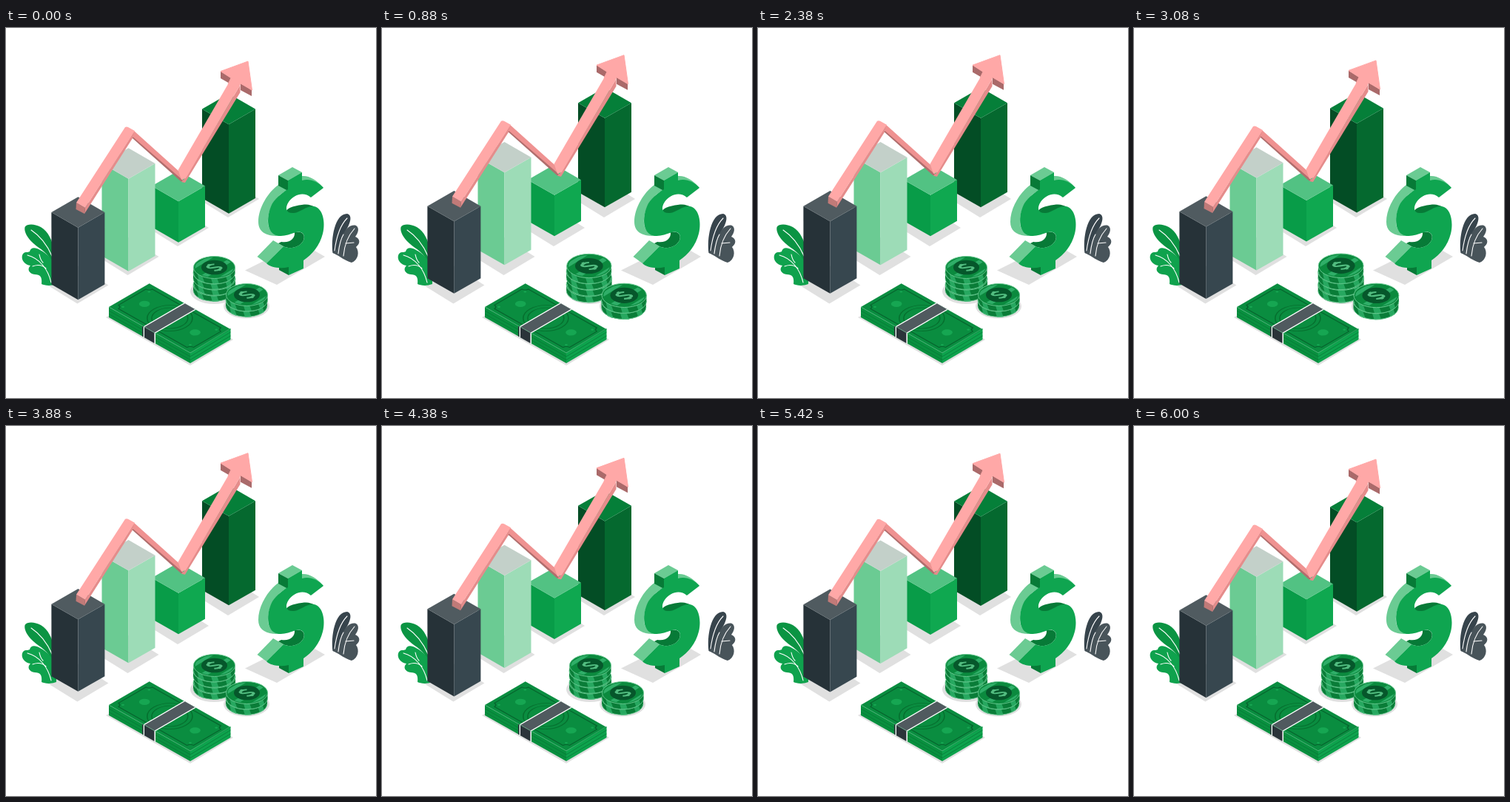
Animation, 500 px wide and 500 px high, one loop 6.04 s. Source, as an HTML page:

```html
<!DOCTYPE html>
<html lang="en">
<head>
<meta charset="utf-8">
<title>Growth chart</title>
<style>
html, body { margin: 0; width: 100%; height: 100%; overflow: hidden; background: #fff; }
svg { display: block; width: 100vw; height: 100vh; }
.vein { fill: none; stroke: #fff; stroke-width: 1.1; stroke-linecap: round; }
</style>
</head>
<body>
<svg viewBox="0 0 500 500">
  <defs>
    <clipPath id="coinClip"><ellipse rx="26" ry="13.4"/></clipPath>
    <clipPath id="rimClip"><path d="M-28 0A28 15 0 0 0 28 0V8A28 15 0 0 1-28 8Z"/></clipPath>
    <g id="coin">
      <path d="M-28 0V7.5A28 15 0 0 0 28 7.5V0Z" fill="#0a7d38"/>
      <path d="M-24 4l6 3 5 14h-7zM-6 10h8l6 16h-9zM14 8l6-4 4 12-6 3z" fill="#27a860" clip-path="url(#rimClip)"/>
      <path d="M-28 7.300A28 15 0 0 0 28 7.300" fill="none" stroke="#6bcb93" stroke-width=".8"/>
      <ellipse rx="28" ry="15" fill="#0b8a3e" stroke="#6bcb93" stroke-width=".9"/>
      <g clip-path="url(#coinClip)">
        <path d="M-30-2L-4-17H4L-30 4ZM-18 11L22-13l5 3L-11 14ZM4 15L30-1V4L11 15Z" fill="#2fae68"/>
      </g>
      <ellipse rx="17.500" ry="9.800" fill="#06572b"/>
      <path transform="matrix(.95 -.42 .95 .47 0 0)" d="M4.600-4.600C2-7.500-4.800-7-4.800-3.400S4.800 0 4.800 3.600-2 7.500-4.800 4.600M0-9V-6M0 6V9" fill="none" stroke="#52bd80" stroke-width="3"/>
    </g>
  </defs>

  <g id="shadows" fill="#e0e0e0">
    <path d="M323 327.500L398 290L431 309L366 347Z"/>
    <path d="M135 391L194 357L307 421L249 456Z"/>
    <ellipse cx="281" cy="356" rx="32" ry="17"/>
    <ellipse cx="325" cy="376" rx="31" ry="16.500"/>
  </g>

  <g id="leftPlant">
    <path d="M62 318C58 304 46 299 37 291C29 284 24 275 25.500 269C29 264 39 265 47 269C57 275 63 287 65 302V318Z" fill="#0b9443"/>
    <path d="M48 346C49 336 46 333 39 333C31 332 28 326 33 321C26 320 20 314 22 307C24 301 30 304 32 302C33 296 40 296 46 300C56 305 64 314 68 324V346C60 349 52 348 48 346Z" fill="#0fa24d"/>
    <path class="vein" d="M34 273C46 281 56 294 62 308M29 307C45 311 57 326 61 344M45 306C46 311 48 315 50 317M36 322C44 319 50 321 54 325"/>
  </g>
  <g id="rightPlant">
    <path d="M441.500 304C439 285 444 251 461 251C469 253 465 265 459 274C453 283 451 294 449 306Z" fill="#37444c"/>
    <path d="M442 304C448 301 452 290 455 281C458 271 466 265 473 267C478 270 476 277 472 282C479 285 479 291 473 296C478 302 476 314 467 317C459 315 452 309 442 304Z" fill="#48545a"/>
    <path class="vein" d="M461 257C450 268 446 286 444 301M471 271C461 282 457 296 456 308M459 291L470 290M456 279C451 287 450 297 449 305"/>
  </g>

  <g id="chart">
    <g id="bars"></g>
    <g id="arrow">
      <path d="M170 142L173 139L233 193L241 209L236 205L172 149Z" fill="#ef9291"/>
      <path d="M169 145L237 204L241 209L236 207L171 149Z" fill="#b06e6d"/>
      <path d="M107 243L173 140L171 149L106 251Z" fill="#e58c8b"/>
      <path d="M95 236L107 243L106 251L94.500 245Z" fill="#c17a78"/>
      <path d="M95 236L161 134Q163 133 165 134L174 139L172 142L107 243Z" fill="#ffa8a7"/>
      <path d="M243 202L316.500 77L316.500 87L242 209L237 208Z" fill="#e58c8b"/>
      <path d="M232.500 192L304 69L317 76L243 203L237 205Z" fill="#ffa8a7"/>
      <path d="M290 58L304 67V76L290 68ZM317 74L332 84V92L317 84Z" fill="#aa6a6a"/>
      <path d="M290 58.500L327 45L332.500 84L317 75L312 82L300 76L304 67.500Z" fill="#ffa8a7" stroke="#ffa8a7" stroke-linejoin="round"/>
    </g>
  </g>

  <g id="sign">
    <path d="M368 199L387 188L400 195L381 206ZM381 219C363 226 353 247 354 264C355 274 361 279 372 281C352 282 341 276 341 262C341 243 354 222 368 212ZM339.500 309L361 287L375 295L352 318ZM400 200C409 199 420 205 429 216L400 209Z" fill="#6bcb93"/>
    <path d="M368 199L381 206V220L368 213ZM378 249C380 241 398 239 404 238.500C409 238 413 240 416 241L389 252ZM368 291L375 295C382 299 396 298 402 287C405 279 400 274 390 276C391 284 384 291 372 289ZM369 322H382V334L369 327Z" fill="#077a37"/>
    <path d="M381 206L400 195V206C410 203 421 207 429 216L412 229C403 221 390 224 382 235C376 244 379 251 389 250C398 249 406 240 416 241C428 243 432 262 428 278C424 294 414 306 402 314V325L382 334V323C370 326 356 323 352 318L375 295C382 299 396 298 402 287C405 279 400 274 392 276C380 280 370 284 361 278C351 270 353 250 360 237C366 228 374 222 381 218Z" fill="#0fa550"/>
  </g>

  <g id="coins"></g>

  <g id="cash">
    <path d="M139 377L249 439V453L139 391Z" fill="#09903f"/>
    <path d="M249 439L303.500 406V421L249 453Z" fill="#0ea34d"/>
    <path d="M139 382L249 444L303.500 411M139 386.500L249 448.500L303.500 416" fill="none" stroke="#077435" stroke-width=".7"/>
    <g transform="matrix(.866 .488 .862 -.5 139 377)">
      <path d="M0 0H127V63.500H0Z" fill="#0a8d40"/>
      <path d="M10 5H117A5 5 0 0 0 122 10V53A5 5 0 0 0 117 58H10A5 5 0 0 0 5 53V10A5 5 0 0 0 10 5Z" fill="none" stroke="#06642d" stroke-width="1.300"/>
      <g fill="none" stroke="#06702f" stroke-width="1.300">
        <circle cx="63.500" cy="31.750" r="25"/><circle cx="63.500" cy="31.750" r="20"/>
      </g>
      <g fill="#16a652">
        <circle cx="24" cy="31.750" r="6"/><circle cx="103" cy="31.750" r="6"/>
        <circle cx="11" cy="11" r="1.600"/><circle cx="11" cy="52" r="1.600"/>
        <circle cx="116" cy="11" r="1.600"/><circle cx="116" cy="52" r="1.600"/>
      </g>
      <path d="M54 0H72.500V63.500H54Z" fill="#fff"/>
      <path d="M55.500 0H71V63.500H55.500Z" fill="#505a5f"/>
    </g>
    <path d="M185.500 403.200L202 412.500V427L185.500 417.300Z" fill="#fff"/>
    <path d="M184 402.500L185.500 403.200V417.300L184 416.500ZM187 404.100L200.500 411.700V426L187 418.200Z" fill="#2b343a"/>
    <path d="M139 377L249 439L303.500 406" fill="none" stroke="#5cc58a" stroke-width=".5"/>
  </g>
</svg>
<script>
const LOOP = 6040, CYCLE = 6000, STEP = CYCLE / 144;
const el = id => document.getElementById(id);
const add = (id, markup) => el(id).insertAdjacentHTML('beforeend', markup);

// centre x, centre y of the top, height, then left, right and top colours
const bars = [
  [301, 109.500, 120.500, '#034d25', '#05692f', '#057f39'],
  [233, 213.500, 55.500, '#089c48', '#0fa850', '#52c283'],
  [165.500, 183, 125, '#6bcb93', '#9ddcb7', '#c3d0c9'],
  [97.400, 249, 97.500, '#263238', '#37474f', '#505b60']
];
const W = 36, H = 20.7;
for (const [x, y, h, left, right, top] of bars) {
  const base = y + h;
  add('shadows', `<path d="M${x - 43} ${base}L${x} ${base - 25}L${x + 41} ${base + 1}L${x - 1} ${base + 26}Z"/>`);
  add('bars', `
    <path fill="${left}" d="M${x - W} ${y}L${x} ${y + H}V${base + H}L${x - W} ${base}Z"/>
    <path fill="${right}" d="M${x + W} ${y}L${x} ${y + H}V${base + H}L${x + W} ${base}Z"/>
    <path fill="${top}" d="M${x - W} ${y}L${x} ${y - H}L${x + W} ${y}L${x} ${y + H}Z"/>`);
}

const coins = [[281, 347], [282, 339], [281, 331], [281.500, 323.500], [325, 368], [325.500, 360.500]];
for (const [x, y] of coins) add('coins', `<use href="#coin" x="${x}" y="${y}"/>`);

// time, scale
const beat = [[0, 1], [600, 1.1], [1800, 1], [2400, 1], [3000, 1.1], [3600, 1], [CYCLE, 1]];

function along(table, t) {
  const i = Math.max(1, table.findIndex(p => p[0] >= t));
  const [t0, a] = table[i - 1], [t1, b] = table[i];
  return a + (b - a) * (t - t0) / (t1 - t0);
}

function draw(ms) {
  const t = Math.min(CYCLE, Math.floor((ms % LOOP + 5) / STEP) * STEP);
  const rise = 10 * (1 - Math.abs(t % 1500 / 750 - 1));
  el('chart').setAttribute('transform', `translate(0 ${-rise})`);
  el('coins').setAttribute('transform', `translate(303 349.500) scale(${along(beat, t)}) translate(-303 -349.500)`);
}

function tick() {
  draw(performance.now() - start);
  requestAnimationFrame(tick);
}
const start = performance.now();
draw(0);
requestAnimationFrame(tick);
</script>
</body>
</html>
```
